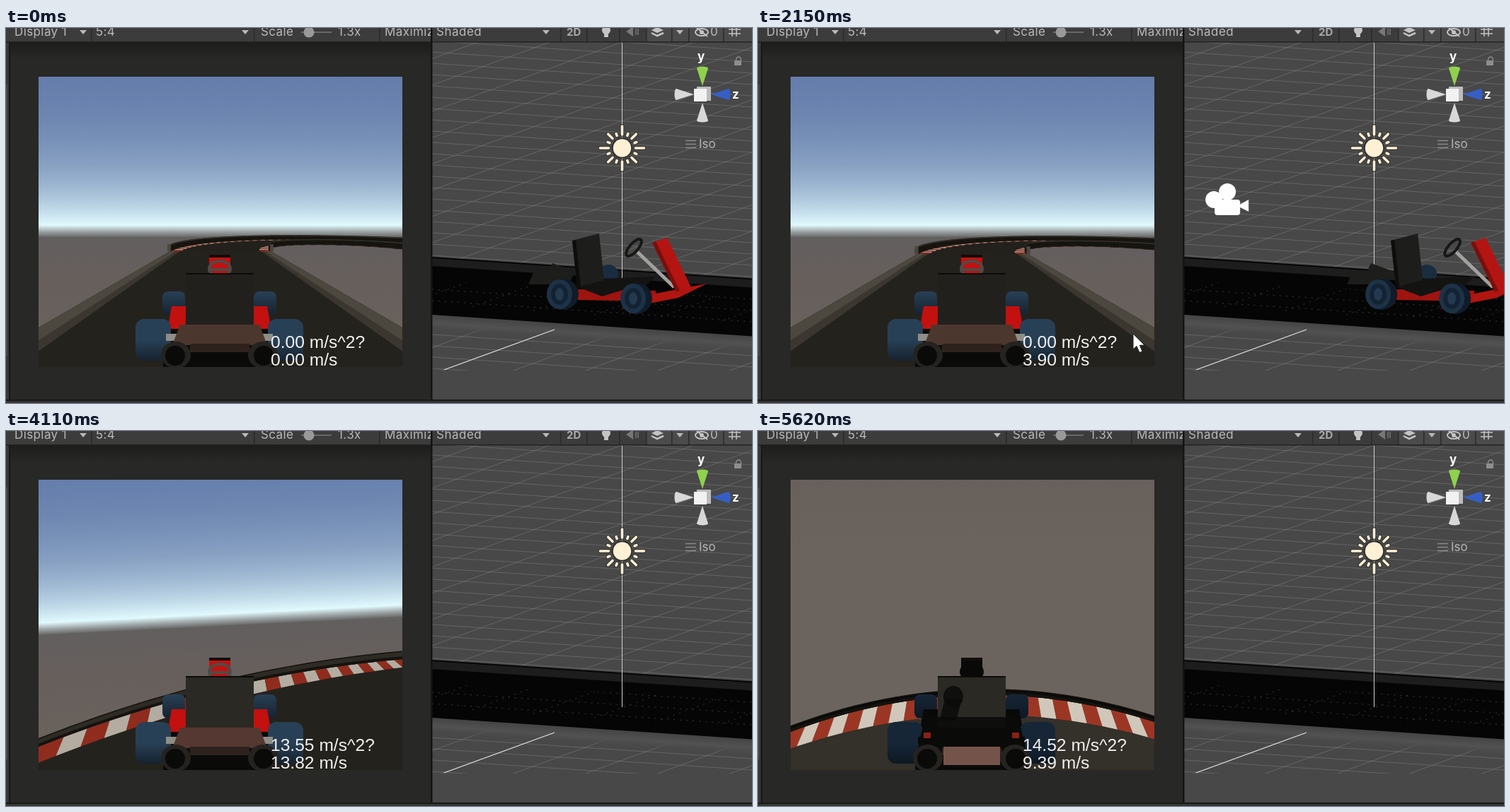
Write an HTML page with a canvas that moves like this. It is 1054 by 531 pixels and loops after 5670 ms.

```html
<!DOCTYPE html>
<html lang="en">
<head>
<meta charset="utf-8">
<title>Kart test</title>
<style>
html, body { margin: 0; width: 100%; height: 100%; overflow: hidden; background: #282826; }
canvas { display: block; }
</style>
</head>
<body>
<canvas id="stage" width="1054" height="531"></canvas>
<script>
const g = document.getElementById('stage').getContext('2d');
const LOOP = 5.67, START = 1.4, BEND_IN = 3.53, HIT = 4.11, BRAKE = 4.552;
const ACCEL = 5.06, FOCAL = 357, EYE = 1.95, CX = 303;
const BEND = { x: 8.35, z: 17, inner: 5, outer: 11.7 };
const UI = '17px Inter, sans-serif', INK = '#b9b9b9', BLACK = '#0a0a09';

const lerp = (a, b, k) => a + (b - a) * k;
const clamp = v => Math.max(0, Math.min(1, v));
const ramp = (t, from, to) => clamp((t - from) / (to - from));
const smooth = v => v * v * (3 - 2 * v);
const mix = (a, b, k) => `rgb(${a.map((v, i) => Math.round(lerp(v, b[i], k)))})`;

function path(pts) {
  g.beginPath();
  for (let i = 0; i < pts.length; i += 2) g.lineTo(pts[i], pts[i + 1]);
}
function poly(fill, ...pts) {
  path(pts); g.closePath(); g.fillStyle = fill; g.fill();
}
// Parallelogram from a corner and two edge vectors.
const slab = (fill, x, y, ux, uy, vx, vy) =>
  poly(fill, x, y, x + ux, y + uy, x + ux + vx, y + uy + vy, x + vx, y + vy);
function line(color, width, ...pts) {
  path(pts); g.strokeStyle = color; g.lineWidth = width; g.stroke();
}
function rect(fill, x, y, w, h, r = 0) {
  g.beginPath(); g.roundRect(x, y, w, h, r); g.fillStyle = fill; g.fill();
}
function oval(fill, x, y, rx, ry = rx) {
  g.beginPath(); g.ellipse(x, y, rx, ry, 0, 0, 7); g.fillStyle = fill; g.fill();
}
function ring(color, width, x, y, rx, ry = rx, turn = 0) {
  g.beginPath(); g.ellipse(x, y, rx, ry, turn, 0, 7);
  g.strokeStyle = color; g.lineWidth = width; g.stroke();
}
function text(s, x, y, color = INK, font = UI, spacing = 0) {
  g.font = font; g.fillStyle = color; g.letterSpacing = spacing + 'px';
  g.fillText(s, x, y);
}
function fade(y0, y1, ...colors) {
  const grad = g.createLinearGradient(0, y0, 0, y1);
  colors.forEach((c, i) => grad.addColorStop(i / (colors.length - 1), c));
  return grad;
}
function clipped(x, y, w, h, draw) {
  g.save(); g.beginPath(); g.rect(x, y, w, h); g.clip();
  draw(); g.restore();
}
function moved(x, y, turn, draw) {
  g.save(); g.translate(x, y); g.rotate(turn); draw(); g.restore();
}

const distance = t => ACCEL / 2 * Math.max(0, t - START) ** 2;
const throttle = t => ACCEL * Math.max(0, t - START + .02);
const speed = t => Math.min(14.8, throttle(t)) * (t > START) - ACCEL * Math.max(0, t - BRAKE);
const boost = t => t < 3.3 ? 0 : Math.min(14.52, throttle(t) - .27);

function sky(rise, tilt) {
  moved(CX, 293 + rise, tilt, () => {
    const bands = Array.from({ length: 21 }, (_, i) =>
      mix([90, 115, 164], [225, 250, 254], Math.exp((i - 20) * 10.5 / 80)));
    rect(fade(-224, -14, ...bands), -400, -330, 800, 317);
    rect(fade(-14, 4, bands[20], '#9fa7a8', '#625f5f'), -400, -14, 800, 18);
    rect(fade(4, 190, '#625f5f', '#675f5c', '#69615c', '#6b635d'), -400, 3, 800, 900);
  });
}

function drawTrack(t, rise, tilt) {
  const turn = ramp(t, BEND_IN, HIT);
  const cam = { x: 1.5 * turn, z: distance(t) };
  const sin = Math.sin(.37 * turn), cos = Math.cos(.37 * turn);
  const wall = lerp(.45, .2, turn);
  const depth = ([x, z]) => (z - cam.z) * cos - (x - cam.x) * sin;

  function project(p) {
    const d = Math.max(.4, depth(p));
    const x = CX + FOCAL * ((p[0] - cam.x) * cos + (p[1] - cam.z) * sin) / d;
    return [x, 275 + rise + FOCAL * (EYE - (p[2] || 0)) / d + tilt * (x - CX)];
  }
  function quad(color, ...pts) {
    if (depth(pts[0]) < .4 || depth(pts[1]) < .4) return;
    poly(color, ...pts.flatMap(project));
    g.strokeStyle = color; g.lineWidth = .7; g.stroke();
  }
  const onArc = (r, a, y = 0) => [BEND.x - r * Math.cos(a), BEND.z + r * Math.sin(a), y];
  // Band along the bend between two radii and two heights, far end first.
  function band(r0, r1, y0, y1, color) {
    const n = Math.round(Math.PI * r0 / .26);
    for (let i = n - 1; i >= 0; i--) {
      const a = i * Math.PI / n, b = a + Math.PI / n;
      quad(color(i), onArc(r0, a, y0), onArc(r0, b, y0), onArc(r1, b, y1), onArc(r1, a, y1));
    }
  }
  function side(r, inward) {
    band(r, r + inward, 0, 0, i => i % 4 < 2 ? '#842c1f' : '#aca498');
    band(r, r, 0, wall, () => '#171510');
    band(r, r, wall * .9, wall, () => '#35322b');
  }

  const asphalt = '#24221d', near = cam.z + 1;
  band(BEND.outer, BEND.inner, 0, 0, () => asphalt);
  if (near < BEND.z) {
    const strip = (color, x0, x1) => quad(color, [x0, near], [x0, BEND.z], [x1, BEND.z], [x1, near]);
    strip(asphalt, -3.35, 3.35);
    for (const s of [-1, 1]) {
      strip('#3b3730', s * 2.75, s * 3);
      strip('#4d483f', s * 3, s * 3.35);
    }
  }
  side(BEND.outer, -.65);
  side(BEND.inner, .65);
  for (const s of [-1, 1])
    quad('#4b4740', [s * 3.35, BEND.z], [s * 3.55, BEND.z], [s * 3.55, BEND.z, wall], [s * 3.35, BEND.z, wall]);
}

// Close-up of the outer barrier once the kart noses into it.
function drawBarrier(t) {
  const nose = ramp(t, HIT, BRAKE), settle = ramp(t, BRAKE, LOOP - .05);
  const unit = x => (x - CX) / 257;
  const top = x => 354 + 14 * nose - 2 * settle + (55 * nose - 62) * unit(x)
    + (20 + 8 * nose + 17 * settle) * unit(x) ** 2;
  const thick = 11 + 6 * nose - 9 * settle;
  const foot = x => top(x) + thick;
  const kerb = x => 19 + 14 * nose - 5 * settle - 9 * (1 - nose) * unit(x);
  const xs = Array.from({ length: 38 }, (_, i) => 30 + i * 15);
  const edge = f => xs.flatMap(x => [x, f(x)]);

  poly(mix([36, 34, 29], [52, 48, 42], settle), ...edge(top), 585, 490, 30, 490);
  const stripes = 25, squeeze = lerp(.56, 1, nose);
  const mark = i => CX - 257 + 514 * i / (i + squeeze * (stripes - i));
  const spread = x => CX + (x - CX) * 1.05;
  const red = mix([143, 44, 29], [156, 54, 36], settle);
  const white = mix([180, 172, 161], [208, 199, 186], settle);
  for (let i = -2; i < stripes + 2; i++) {
    const a = mark(i), b = mark(i + 1);
    poly(i % 2 ? white : red, a, foot(a), b, foot(b),
      spread(b), foot(b) + kerb(b), spread(a), foot(a) + kerb(a));
  }
  poly(mix([46, 43, 37], [10, 10, 8], settle), ...edge(top),
    ...xs.slice().reverse().flatMap(x => [x, foot(x)]));
  line('#14120f', 1.5, ...edge(top));
  line('#15130f', 4, ...edge(x => foot(x) - 2));
}

function rearKart(t) {
  const lit = ramp(t, BEND_IN, HIT), dark = ramp(t, HIT, 5.4);
  const mirror = draw => {
    draw();
    g.save(); g.translate(2 * CX - 3, 0); g.scale(-1, 1); draw(); g.restore();
  };
  // Trapezoid around the kart's centre line.
  const trap = (fill, y0, half0, y1, half1) =>
    poly(fill, 302 - half0, y0, 302 + half0, y0, 302 + half1, y1, 302 - half1, y1);
  const shaded = color => mix(color, [9, 9, 8], dark);
  const tyre = mix([40, 64, 86], [22, 38, 55], dark), tread = mix([22, 34, 46], [14, 24, 35], dark);
  const body = shaded([194, 17, 14]), steel = shaded([78, 75, 72]);

  rect(body, 287, 322, 30, 26);
  rect('#130c0a', 287, 321, 30, 4);
  ring(steel, 4, 302, 341, 15, 11);
  line(steel, 4, 289, 342, 315, 342);
  mirror(() => {
    rect(fade(373, 407, tyre, tread), 221, 373, 32, 34, 8);
    slab(body, 234, 394, 24, 0, -6, 34);
    rect(BLACK, 222, 426, 80, 54);
    rect(fade(412, 471, tyre, tyre, tread), 183, 412, 50, 59, 12);
    rect(shaded([142, 141, 136]), 226, 433, 16, 10);
  });
  trap(mix([76, 55, 47], [84, 56, 49], lit), 420, 56, 449, 67);
  trap('#2e221d', 447, 42, 459, 42);
  g.globalAlpha = dark;
  trap(BLACK, 405, 66, 449, 76);
  trap('#74534a', 447, 40, 473, 40);
  mirror(() => rect('#8a2117', 234, 427, 10, 8));
  g.globalAlpha = 1;
  rect(mix([34, 32, 29], [43, 41, 35], lit), 254, 347, 96, 73, 2);
  line('#0c0b09', 2, 254, 348, 350, 348);
  g.globalAlpha = ramp(t, BRAKE, 5.4) * .85;
  oval(BLACK, 276, 376, 14, 15);
  slab(BLACK, 264, 380, 24, 0, -8, 30);
  rect(BLACK, 254, 405, 96, 15);
  g.globalAlpha = 1;
  mirror(() => {
    oval('#25231f', 240, 463, 21, 19);
    oval(BLACK, 239, 464, 14);
  });
}

function gameView(t) {
  const turn = ramp(t, BEND_IN, HIT), dive = ramp(t, HIT, HIT + .67);
  const rise = -20 * turn ** 2 - 300 * dive ** 1.5;
  const tilt = -.05 * turn * (1 - smooth(dive));
  clipped(46, 69, 514, 411, () => {
    sky(rise, tilt);
    if (t < HIT) drawTrack(t, rise, tilt); else drawBarrier(t);
    rearKart(t);
    [boost(t).toFixed(2) + ' m/s^2?', speed(t).toFixed(2) + ' m/s'].forEach((s, i) =>
      text(s, 374, 453 + 25 * i, '#f1f1ef', '24.6px "Liberation Sans", Arial, sans-serif'));
  });
}

function sideKart() {
  const red = '#a01410', seat = '#1d1d1b';
  oval('#1a2d40', 851, 348, 14, 13);
  slab(seat, 746, 345, 56, 0, -8, 18);
  slab(seat, 772, 333, 32, 12, -8, 16);
  slab(red, 808, 370, 110, 2, 0, 15);
  slab('#b01511', 908, 378, 82, -16, -40, 20);
  slab('#131312', 806, 366, 40, -12, 36, 14);
  slab('#131312', 843, 355, 75, -3, -16, 15);
  slab(seat, 800, 301, 38, -10, 7, 66);
  slab('#0d0d0c', 800, 301, 5, -1, 7, 66);
  line('#a3a19d', 5, 892, 317, 944, 367);
  ring('#171716', 4, 887, 311, 15, 6, -.85);
  slab('#b41512', 913, 304, 21, -7, 34, 70);
  slab('#7a0f0c', 913, 304, 5, -2, 34, 70);
  for (const [x, y] of [[784, 377], [888, 383]]) {
    oval('#101c28', x + 3, y, 22);
    ['#1d3247', '#132333', '#22394f'].forEach((c, i) => oval(c, x - 2, y, 18 - 6 * i, 21 - 6 * i));
  }
}

function sun(x, y) {
  const layer = (color, grow) => {
    g.lineCap = 'round';
    for (let i = 0; i < 16; i++) moved(x, y, i * Math.PI / 8, () =>
      line(color, 3.6 + grow, 19, 0, i % 4 ? i % 2 ? 22 : 28 : 31, 0));
    g.lineCap = 'butt';
    oval(color, x, y, 12.7 + grow);
  };
  layer('#333230', 2);
  layer('#fdf0d4', 0);
}

function cameraIcon(x) {
  oval('#fff', x - 19, 243, 12);
  oval('#fff', x, 232, 12);
  rect('#fff', x - 18, 243, 36, 22, 4);
  poly('#fff', x + 14, 252, x + 30, 243, x + 30, 260);
}

function gizmo() {
  const cones = ['#355fc4', '#d8d8d8', '#d8d8d8', '#8fd14c'];
  cones.forEach((color, i) => moved(984, 94, i * Math.PI / 2, () => {
    poly(color, 12, 0, 37, -8, 37, 8);
    oval(color, 37, 0, 2.5, 8);
  }));
  rect('#bcbcbc', 976, 83, 20, 20);
  rect('#f2f2f2', 972, 86, 18, 18);
  text('y', 977, 46, '#fff', 'bold ' + UI);
  text('z', 1026, 100, '#fff', 'bold ' + UI);
  rect('#8f8f8f', 1029, 46, 10, 7, 1);
  ring('#8f8f8f', 1.5, 1035, 45, 3.5, 4);
  for (let y = 159.5; y < 170; y += 5) line('#8b8b8b', 1.5, 960, y, 975, y);
  text('Iso', 979, 170, '#b4b4b4');
}

function grid(dash) {
  const color = 'rgba(150,150,150,.36)';
  g.setLineDash(dash);
  for (let y = -14; y < 520; y += 16) line(color, 1, 602, y, 1054, y + 30);
  for (let i = -25; i < 14; i++) {
    const x = 870 + 86 * i, y = 392 + 5.8 * i;
    line(color, 1, x - 1400, y + 511, x + 1400, y - 511);
  }
  g.setLineDash([]);
}

function sceneView(t) {
  const shift = 66 * distance(t);
  clipped(602, 20, 452, 507, () => {
    rect('#484848', 602, 20, 452, 507);
    clipped(602, 20, 452, 465, () => grid([]));
    g.save();
    g.transform(1, .0675, 0, 1, 0, -602 * .0675);
    rect('#050505', 602, 324, 452, 83);
    rect('#1d1d1d', 602, 326, 452, 11);
    rect(fade(406, 430, '#444', '#525252', 'rgba(72,72,72,0)'), 602, 406, 452, 24);
    g.restore();
    g.save();
    path([602, 358, 1054, 380, 1054, 420, 602, 392]); g.clip();
    grid([2, 7]);
    g.restore();
    line('#e2e2e2', 1.2, 619, 484, 775, 427);
    line('#cfcfcf', 1, 870.5, 20, 870.5, 391);
    moved(shift, 0, 0, sideKart);
    sun(870.5, 170);
    if (shift > 0) cameraIcon(569 + shift);
    gizmo();
  });
}

function toolbar() {
  rect('#3c3c3c', 0, 0, 1054, 20);
  rect('#4b4b4b', 904, 0, 150, 19);
  for (const x of [120, 350, 527, 783, 820, 866, 904, 940, 964, 1013]) rect('#2a2a2a', x, 0, 1.5, 19);
  const labels = { 'Display 1': 12, '5:4': 127, Scale: 360, '1.3x': 469, Maximize: 535 };
  clipped(0, 0, 600, 20, () => {
    for (const s in labels) text(s, labels[s], 11, INK, UI, .4);
  });
  for (const x of [109, 338, 763, 952]) poly(INK, x - 5, 3, x + 5, 3, x, 9);
  line('#686868', 2, 417, 6, 460, 6);
  oval('#999', 428, 6, 7.5);
  text('Shaded', 608, 11, INK, UI, .5);
  text('2D', 792, 11, '#aaa', 'bold 15px Inter, sans-serif');
  const icon = '#c4c4c4';
  oval(icon, 848, 3, 6);
  rect(icon, 845, 8, 6, 5, 1);
  poly('#777', 876, 5, 886, -2, 886, 12);
  for (const x of [890, 893]) line('#777', 1.5, x, 1, x, 10);
  poly(icon, 912, 3, 920, -1, 929, 3, 920, 7);
  line(icon, 2.5, 912, 7, 920, 11, 929, 7);
  ring(icon, 2, 983, 6, 9, 5);
  oval(icon, 983, 6, 3);
  line(icon, 2, 975, -1, 991, 12);
  text('0', 995, 11);
  for (const d of [0, 6]) {
    line(icon, 1.5, 1021, 2 + d, 1038, 2 + d);
    line(icon, 1.5, 1026 + d, 0, 1026 + d, 12);
  }
  rect('#222', 0, 19, 1054, 1.5);
}

function backdrop() {
  rect('#282826', 0, 0, 602, 531);
  rect(fade(20, 44, 'rgba(0,0,0,.3)', 'rgba(0,0,0,0)'), 5, 20, 597, 24);
  rect('#383838', 0, 20, 4, 507);
  rect('#4a4a4a', 0, 80, 2, 385);
  rect('#171717', 4, 0, 2, 527);
}
function borders() {
  rect('#141414', 600, 0, 2.5, 527);
  rect('#191919', 0, 526, 1054, 2);
  rect('#353535', 0, 528, 1054, 3);
}

function pointer(t) {
  const enter = smooth(ramp(t, .12, .55)), leave = smooth(ramp(t, 3.1, 3.48));
  const x = lerp(lerp(960, 530, enter), 850, leave);
  const y = lerp(lerp(533, 433, enter), 535, leave);
  moved(x, y, 0, () => {
    poly('#fff', 0, 0, 0, 22, 5, 17.5, 9, 26.5, 13, 25, 9.3, 16.3, 16, 16);
    g.strokeStyle = '#222'; g.lineWidth = 1; g.stroke();
  });
}

function draw(now) {
  const t = now / 1000 % LOOP;
  backdrop();
  gameView(t);
  sceneView(t);
  toolbar();
  borders();
  pointer(t);
  requestAnimationFrame(draw);
}
requestAnimationFrame(draw);
</script>
</body>
</html>
```
